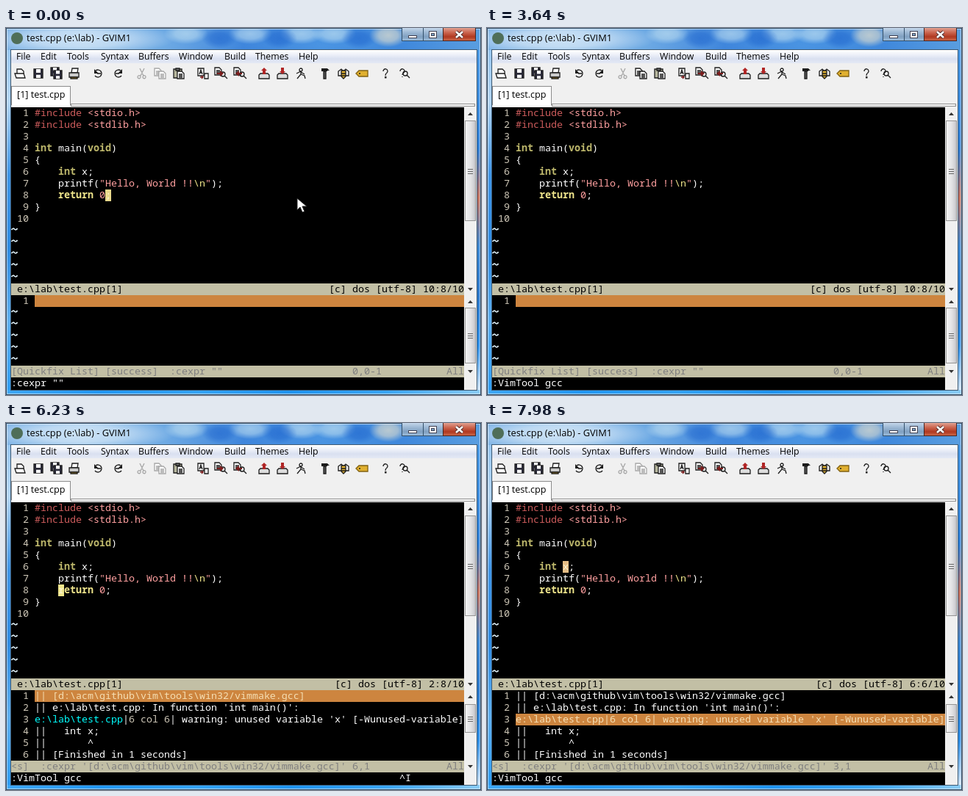
These frames come from a looping animation (646x500 px, 8000 ms). An HTML page with a canvas:

```html
<!DOCTYPE html>
<html>
<head>
<meta charset="utf-8">
<style>
html, body { margin: 0; width: 646px; height: 500px; overflow: hidden; }
canvas { display: block; }
</style>
</head>
<body>
<canvas id="stage" width="646" height="500"></canvas>
<script>
const g = document.getElementById('stage').getContext('2d');
const LOOP = 8000, CELL = 8, ROW = 16, LEFT = 7, CODE_Y = 108, QF_Y = 364;
const C = {
  text: '#fff', num: '#cfc8b8', bar: '#c2bfa5', dim: '#7f7f7f', peru: '#cd853f', wheat: '#f5deb3',
  khaki: '#f0e68c', type: '#bdb76b', pink: '#ffa0a0', red: '#cd5c5c',
  tilde: '#dcecf4', cyan: '#00ffff', face: '#f0f0f0'
};
const PATH = '[d:\\acm\\github\\vim\\tools\\win32/vimmake.gcc]';
const FILE = 'e:\\lab\\test.cpp';
const COMMAND = 'VimTool gcc';
const KEYS = [770, 910, 1050, 1260, 1400, 1540, 1820, 1960, 2100, 2310, 2450];

// Each line is a list of [text, colour, bold].
const CODE = [
  [['#include ', C.red], ['<stdio.h>', C.pink]],
  [['#include ', C.red], ['<stdlib.h>', C.pink]],
  [],
  [['int', C.type, 1], [' main('], ['void', C.type, 1], [')']],
  [['{']],
  [['    '], ['int', C.type, 1], [' x;']],
  [['    printf('], ['"Hello, World !!', C.pink], ['\\n', C.khaki], ['"', C.pink], [');']],
  [['    '], ['return', C.khaki, 1], [' '], ['0', C.pink], [';']],
  [['}']],
  []
];
const OUTPUT = [
  [['|| ' + PATH]],
  [["|| e:\\lab\\test.cpp: In function 'int main()':"]],
  [[FILE, C.cyan], ['|'], ['6 col 6', C.num], ["| warning: unused variable 'x' [-Wunused-variable]"]],
  [['||   int x;']],
  [['||       ^']],
  [['|| [Finished in 1 seconds]']]
];

function rect(x, y, w, h, fill, stroke) {
  if (fill) { g.fillStyle = fill; g.fillRect(x, y, w, h); }
  if (stroke) { g.strokeStyle = stroke; g.lineWidth = 1; g.strokeRect(x + .5, y + .5, w - 1, h - 1); }
}
function blend(x0, y0, x1, y1, ...colors) {
  const b = g.createLinearGradient(x0, y0, x1, y1);
  colors.forEach((c, i) => b.addColorStop(i / (colors.length - 1), c));
  return b;
}
function glow(x, y, rx, ry, rgb, alpha) {
  const b = g.createRadialGradient(0, 0, 0, 0, 0, 1);
  b.addColorStop(0, `rgba(${rgb},${alpha})`);
  b.addColorStop(.5, `rgba(${rgb},${alpha * .8})`);
  b.addColorStop(1, `rgba(${rgb},0)`);
  g.save();
  g.translate(x, y);
  g.scale(rx, ry);
  g.fillStyle = b;
  g.fillRect(-1, -1, 2, 2);
  g.restore();
}
function label(s, x, y, size = 12.3) {
  g.font = size + 'px "Open Sans", "Noto Sans", sans-serif';
  g.fillStyle = '#000';
  g.fillText(s, x, y);
}
function put(col, y, s, color = C.text, bold) {
  g.font = (bold ? 700 : 500) + ' 13.3333px "Noto Sans Mono", "DejaVu Sans Mono", monospace';
  g.fillStyle = color;
  g.fillText(s, LEFT + col * CELL, y + 12);
}
function putLine(row, top, parts, color) {
  const y = top + row * ROW;
  put(0, y, String(row + 1).padStart(3), C.num);
  let col = 4;
  for (const [s, c, bold] of parts) {
    put(col, y, s, color || c, bold);
    col += s.length;
  }
}
function tilde(y) {
  g.strokeStyle = C.tilde;
  g.lineWidth = 1.7;
  g.stroke(new Path2D(`M7.5 ${y + 7}q2 -3 4 -1t4 -1`));
}
function block(col, y, ch = '', color = C.khaki) {
  rect(LEFT + col * CELL, y, CELL, ROW, color);
  put(col, y, ch, '#fff8d8');
}

// Icons are drawn in a 16 px box around cx; each part is [path, fill, stroke].
function icon(cx, ...parts) {
  g.save();
  g.translate(cx - 8, 54);
  for (const [d, fill, stroke] of parts) {
    const p = new Path2D(d);
    if (fill) { g.fillStyle = fill; g.fill(p); }
    if (stroke) { g.strokeStyle = stroke; g.lineWidth = 1.3; g.stroke(p); }
  }
  g.restore();
}
const K = '#1c1c1c', W = '#fff', MAROON = '#7c1d1d', GOLD = '#e0b030';
const floppy = (x, y, s) => [
  [`M${x} ${y}h${s}v${s}h${-s}z`, '#2a2a38', K],
  [`M${x + 3} ${y}h${s - 6}v${s * .42}h${6 - s}z M${x + 3} ${y + s * .65}h${s - 6}v${s * .35}h${6 - s}z`, W]
];
const page = (x, y, ink) => [
  [`M${x} ${y}h6l3 3v7h-9z`, W, ink],
  [`M${x + 2} ${y + 4}h5M${x + 2} ${y + 6}h5M${x + 2} ${y + 8}h5`, 0, ink]
];
const lens = (x, y) => [[`M${x + 3} ${y}a3 3 0 1 1 -6 0a3 3 0 1 1 6 0M${x + 2} ${y + 2}l4 4`, 0, K]];
const drive = ['M1 10l2-2h10l2 2v5h-14z', '#ddd', K];

function toolbar(copyOn) {
  const gray = '#a6a6a6', copyInk = copyOn ? K : gray;
  icon(19, ['M4 8v-6h6l3 3v4', W, K], ['M1 8h12l2 6h-12z', W, K]);
  icon(44, ...floppy(2, 2, 12));
  icon(68, ...floppy(1, 0, 11), ...floppy(5, 4, 11));
  icon(93, ['M4 7l1-6h8l-1 6z', W, K], ['M1 7h13v6h-13z', '#ccc', K], ['M3 13h9v2h-9z', GOLD, K]);
  icon(126, ['M4 4a5 5 0 1 1 -1 7M6 8h5', 0, K], ['M2 2v6h6z', K]);
  icon(152, ['M12 4a5 5 0 1 0 1 7M10 8h-5', 0, K], ['M14 2v6h-6z', K]);
  icon(185, ['M5 1l5 10M11 1l-5 10M6 13a2 2 0 1 1 -3 -2a2 2 0 0 1 3 2M13 13a2 2 0 1 1 -3 -2a2 2 0 0 1 3 2', 0, gray]);
  icon(210, ...page(0, 1, copyInk), ...page(6, 5, copyInk));
  icon(235, ['M1 2h11v12h-11z', '#b9b9a0', K], ['M4 1h5v3h-5z', '#777', K], ...page(6, 5, K));
  icon(268, ['M1 1h8v10h-8z', W, K], ['M3 9l2-6l2 6M4 7h2', 0, K],
    ['M10 8h5v7h-5z', W, K], ['M4 13h4M6 11l2 2l-2 2', 0, MAROON]);
  icon(292, ...page(0, 0, K), ...lens(11, 9), ['M3 7h4v-3l5 4l-5 4v-3h-4z', MAROON]);
  icon(318, ...page(0, 0, K), ...lens(11, 9), ['M11 7h-4v-3l-5 4l5 4v-3h4z', MAROON]);
  icon(351, drive, ['M8 0l4 4h-2v5h-4v-5h-2z', '#b02525']);
  icon(376, drive, ['M8 9l4-4h-2v-5h-4v5h-2z', '#b02525']);
  icon(401, ['M6 3a2 2 0 1 1 4 0a2 2 0 1 1 -4 0', W, K], ['M8 5l-6 3M8 6l5 3M8 5v4l-5 6M8 9l5 2l1 4', 0, K]);
  icon(434, ['M3 1h8l3 3h-3v1h-8z', K], ['M6 5h3v10h-3z', '#555', K]);
  icon(459, ['M1 5l4-3l3 3l3-3l4 3v6h-14z', '#eee', K], ['M5 4h6v8l-3 3l-3-3z', GOLD, K], ['M5 8h6M5 11h6', 0, K]);
  icon(484, ['M0 8l4-4h12v8h-12z', GOLD, '#806010'], ['M4 8h2', 0, K]);
  icon(516, ['M5 5a3 3 0 1 1 5 2q-2 1-2 4', 0, K], ['M7 12h2.5v2.5h-2.5z', K]);
  icon(541, ['M3 5a3 3 0 1 1 5 2q-2 1-2 3M6 12v1', 0, K], ...lens(10, 8));
}

function arrow(y, dir) {
  g.fillStyle = '#333';
  g.beginPath();
  g.moveTo(628, y - 2 * dir);
  g.lineTo(635, y - 2 * dir);
  g.lineTo(631.5, y + 2 * dir);
  g.fill();
}
function scrollbar(top, bottom, thumbTop, thumbEnd) {
  rect(623, top, 17, bottom - top, C.face);
  arrow(top + 9, -1);
  arrow(bottom - 8, 1);
  rect(624, thumbTop, 15, thumbEnd - thumbTop, blend(624, 0, 639, 0, '#f6f6f6', '#e4e4e6', '#c6c6ca'), '#949494');
  const mid = Math.round((thumbTop + thumbEnd) / 2);
  for (let i = -3; i <= 3; i += 3) rect(628, mid + i, 7, 1, '#666');
}

// Window glass with the blurred desktop behind it
function glass() {
  rect(0, 0, 646, 500, blend(0, 0, 0, 500, '#8cc0ee', '#b4d6f2', '#3f96e8', '#2f8ce4', '#5fb0f0', '#2a9cf4'));
  rect(0, 0, 646, 30, blend(0, 0, 646, 0, '#7fb4e6', '#8fc0ea', '#6eaae4', '#3f86dc', '#4a94e2', '#3f88dc', '#5a9ee0'));
  for (const x of [245, 332, 402, 446]) glow(x, 8, 30, 14, '190,222,240', .7);
  for (const x of [290, 372, 480]) glow(x, 14, 24, 14, '30,100,205', .6);
  glow(520, 10, 26, 16, '225,222,205', .75);
  glow(100, 15, 130, 22, '255,255,255', .55);
  rect(640, 30, 6, 470, blend(0, 30, 0, 500, '#4a9ae6', '#3d8ee0', '#2f7fd6', '#c4705c', '#3d8ad6', '#2a78cc', '#2f90e8', '#e4eef6'));
  rect(0, 493, 646, 7, blend(0, 0, 646, 0, '#3fa8f6', '#2298f4', '#34a4f6', '#1f94f0', '#3aa6f4', '#8accf4'));
  rect(0, 0, 646, 500, null, '#2b4a66');
  rect(1, 1, 644, 498, null, 'rgba(255,255,255,.55)');
  rect(6, 29, 635, 465, null, '#3d5a74');
}

function chrome(inList, copyOn) {
  glass();
  g.fillStyle = '#4f6e58';
  g.beginPath();
  g.arc(15, 14, 8, 0, 7);
  g.fill();
  label(inList ? '[No Name] - - GVIM1' : 'test.cpp (e:\\lab) - GVIM1', 28, 18, 12.8);

  const shine = blend(0, 0, 0, 18, '#c4d6ea', '#9db8d4', '#7f9fc0', '#a4c4e0');
  rect(538, -1, 30, 19, shine, '#33506a');
  rect(567, -1, 28, 19, shine, '#33506a');
  rect(594, -1, 45, 19, blend(0, 0, 0, 18, '#e0a090', '#cc6650', '#b03820', '#d07050'), '#4a2520');
  rect(547, 10, 12, 4, W, '#445');
  rect(575, 4, 11, 10, W, '#445');
  rect(578, 7, 5, 4, '#7ba3c4', '#445');
  for (const [ink, width] of [['#533', 4.5], [W, 2.5]]) {
    g.strokeStyle = ink;
    g.lineWidth = width;
    g.stroke(new Path2D('M612 5l9 8M621 5l-9 8'));
  }

  rect(7, 30, 633, 78, C.face);
  rect(7, 30, 633, 18, blend(0, 30, 0, 48, '#fff', '#eef1f9', '#d9e0f0', '#e4e9f5'));
  [['File', 14], ['Edit', 47], ['Tools', 83], ['Syntax', 129], ['Buffers', 180], ['Window', 235],
    ['Build', 297], ['Themes', 339], ['Help', 398]].forEach(([s, x]) => label(s, x, 43));
  toolbar(copyOn);

  const tabEnd = inList ? 96 : 88;
  rect(7, 79, tabEnd - 7, 26, W, '#8c8c8c');
  rect(8, 103, tabEnd - 9, 3, W);
  rect(tabEnd, 103, 638 - tabEnd, 4, W, '#8c8c8c');
  label(inList ? '[1] [Quickfix]' : '[1] test.cpp', 15, 95, 12.6);
}

function status(y, on, ...parts) {
  rect(LEFT, y, 616, ROW, C.bar);
  for (const [col, s] of parts) put(col, y, s, on ? '#000' : C.dim);
}

function pointer(x, y) {
  const p = new Path2D('M0 0v16l4-4l3 7l3-1l-3-7h6z');
  g.save();
  g.translate(x, y);
  g.fillStyle = W;
  g.fill(p);
  g.strokeStyle = '#222';
  g.lineWidth = 1;
  g.stroke(p);
  g.restore();
}

const within = (t, a, b) => t >= a && t < b;

function draw(t) {
  const started = t >= 3850, jumped = t >= 7980, inList = within(t, 6510, 7980);
  const count = !started ? 0 : t < 3920 ? 1 : t < 4060 ? 2 : t < 4410 ? 5 : 6;
  const listRow = t < 6510 ? count : t < 7000 ? 6 : t < 7210 ? 5 : t < 7350 ? 4 : 3;

  chrome(inList, within(t, 140, 3850));
  rect(7, 108, 633, 385, '#000');
  rect(623, 476, 17, 17, C.face);
  scrollbar(108, 364, 126, 263);
  scrollbar(364, 476, count ? 383 : 381, count < 2 ? 457 : count < 6 ? 427 : 422);

  // Code window
  CODE.forEach((line, i) => putLine(i, CODE_Y, line));
  for (let i = 10; i < 15; i++) tilde(CODE_Y + i * ROW);
  if (t < 140) block(16, 220, ';', '#ead98c');
  const blinkOff = within(t, 4760, 5110) || within(t, 5390, 5740) || within(t, 6020, 6160);
  if (within(t, 3850, 6510) && !blinkOff) block(8, 220, 'r');
  if (jumped) block(12, 188, 'x', '#e6bd85');
  const pos = jumped ? '6:6/10' : started ? '2:8/10' : '10:8/10';
  status(348, !inList, [1, FILE + '[1]'], [77 - 16 - pos.length, '[c] dos [utf-8] ' + pos]);

  // Quickfix window
  const marked = jumped ? 2 : 0;
  rect(39, QF_Y + marked * ROW, 584, ROW, C.peru);
  for (let i = 0; i < 6; i++) {
    if (i < Math.max(count, 1)) putLine(i, QF_Y, i < count ? OUTPUT[i] : [], i === marked && C.wheat);
    else tilde(QF_Y + i * ROW);
  }
  if (inList) block(4, QF_Y + (listRow - 1) * ROW, listRow === 3 ? 'e' : '|');
  const title = started
    ? `<${count < 6 ? 'g' : 's'}]  :cexpr '${PATH}'`
    : '[Quickfix List] [success]  :cexpr ""';
  status(460, inList, [0, title], [58, started ? listRow + ',1' : '0,0-1'], [74, 'All']);

  // Command line
  const typed = KEYS.filter(k => t >= k).length;
  put(0, 476, t < 140 ? ':cexpr ""' : ':' + COMMAND.slice(0, typed));
  if (within(t, 140, 3640) && !within(t, 3080, 3290)) block(1 + typed, 476);
  if (within(t, 6230, 6510)) put(66, 476, '^I');
  if (t < 140) pointer(396, 232);
}

const start = performance.now();
function tick() {
  draw((performance.now() - start) % LOOP);
  requestAnimationFrame(tick);
}
tick();
</script>
</body>
</html>
```
